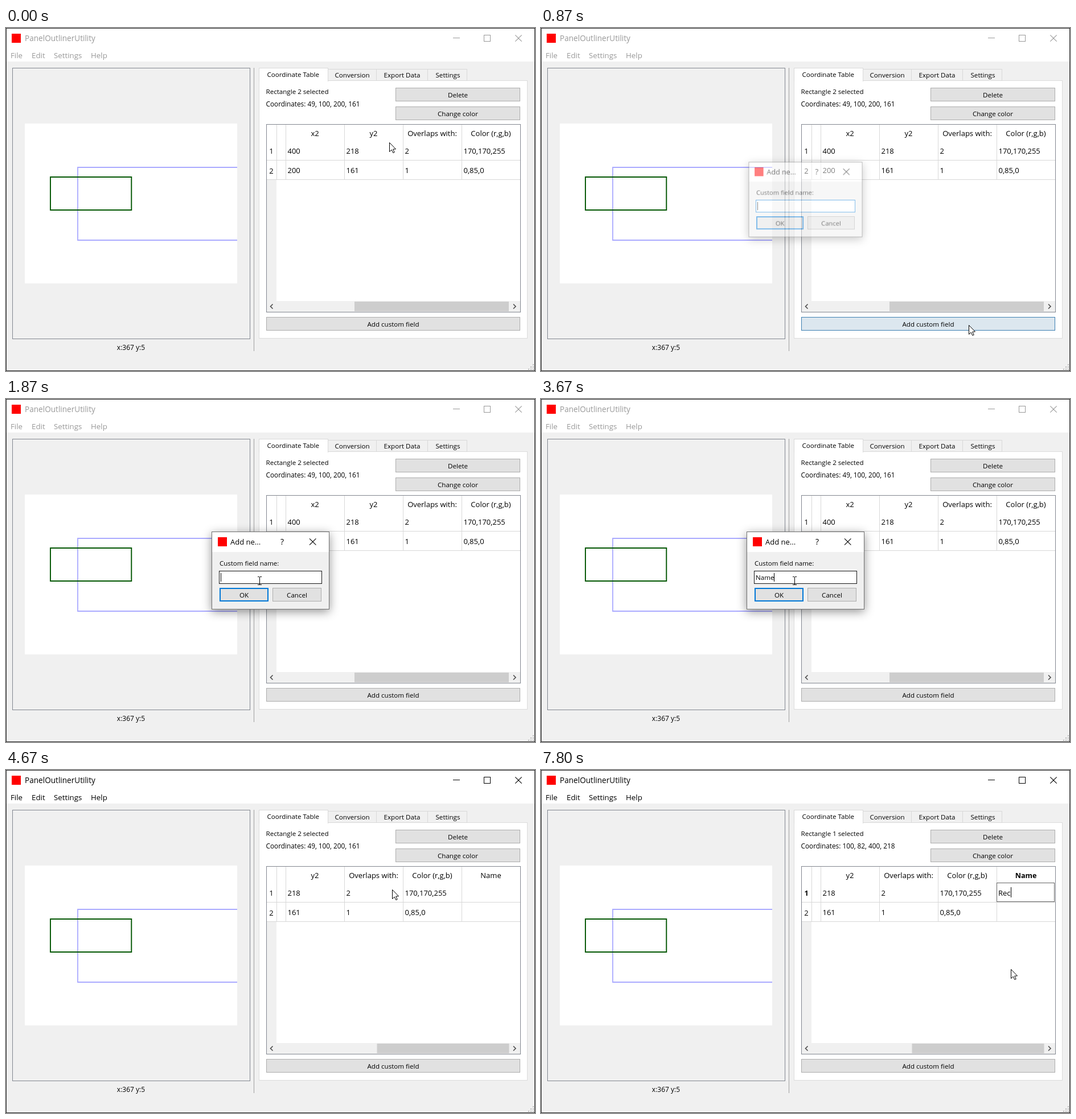
Recreate the animation shown at these times as an HTML page with a canvas. Size 929 by 603 pixels, loop 8 s.

```html
<!DOCTYPE html>
<html lang="en">
<head>
<meta charset="utf-8">
<title>Rectangle table</title>
<style>
html, body { margin: 0; width: 100%; height: 100%; overflow: hidden; background: #f0f0f0; }
canvas { display: block; }
</style>
</head>
<body>
<canvas id="stage" width="929" height="603"></canvas>
<script>
const W = 929, H = 603, LOOP = 8000, TICK = 200 / 3;
const stage = document.getElementById('stage').getContext('2d');
const layerCanvas = document.createElement('canvas');
layerCanvas.width = W;
layerCanvas.height = H;
const layer = layerCanvas.getContext('2d');
let g = stage;

const UI = '"Open Sans", "Noto Sans", sans-serif';
const SMALL = '11.6px ' + UI, CELL = '13px ' + UI, BOLD = 'bold 12.6px ' + UI;
const GREY = '#f0f0f0', GRID = '#d8d8d8', FRAME = '#828790', BLUE = '#0078d7';

const clamp = v => Math.max(0, Math.min(1, v));
const ease = v => v * v * (3 - 2 * v);

function fill(x, y, w, h, color) {
  g.fillStyle = color;
  g.fillRect(x, y, w, h);
}

// Filled box with an inner border
function box(x, y, w, h, color, border, line = 1) {
  fill(x, y, w, h, border);
  fill(x + line, y + line, w - 2 * line, h - 2 * line, color);
}

function text(str, x, y, font = SMALL, color = '#000', align = 'left') {
  g.font = font;
  g.fillStyle = color;
  g.textAlign = align;
  g.fillText(str, x, y);
  return g.measureText(str).width;
}

function path(points, color, width = 1, closed = false) {
  g.beginPath();
  points.forEach(([x, y]) => g.lineTo(x, y));
  if (closed) g.closePath();
  g.strokeStyle = color;
  g.lineWidth = width;
  g.stroke();
}

function button(label, x, y, w, h, color = '#e1e1e1', border = '#adadad', line = 1) {
  box(x, y, w, h, color, border, line);
  text(label, x + w / 2, y + h / 2 + 4.5, SMALL, '#000', 'center');
}

function cross(x, y, r, color) {
  path([[x - r, y - r], [x + r, y + r]], color, 1.1);
  path([[x + r, y - r], [x - r, y + r]], color, 1.1);
}

function drawWindow(active) {
  box(0, 0, W, H, GREY, '#2b2b2b');
  fill(1, 1, W - 2, 58, '#fff');
  const ink = active ? '#000' : '#999';
  fill(10, 10, 16, 16, '#f00');
  text('PanelOutlinerUtility', 33, 23, '13.6px ' + UI, ink);
  [['File', 8], ['Edit', 45], ['Settings', 84], ['Help', 149]]
    .forEach(([name, x]) => text(name, x, 53, '13.3px ' + UI, ink));
  fill(785, 17, 12, 1, ink);
  box(839, 12, 12, 12, '#fff', ink);
  cross(900, 18, 5.7, ink);

  for (let r = 0; r < 3; r++)
    for (let c = 0; c <= r; c++) fill(925 - c * 4, 591 + r * 4, 2, 2, '#b8b8b8');
}

function drawView() {
  box(11, 70, 418, 477, GREY, FRAME);
  fill(33, 168, 373, 281, '#fff');
  path([[406, 245], [126, 245], [126, 373], [406, 373]], '#aaaaff', 1.8);
  path([[78, 262], [220.3, 262], [220.3, 320], [78, 320]], '#005500', 1.9, true);
  text('x:367 y:5', 219.5, 566, '12px ' + UI, '#000', 'center');
  fill(435, 70, 1, 498, '#a0a0a0');
}

function drawTabs() {
  box(444, 92, 472, 454, '#fff', '#dcdcdc');
  [['Conversion', 565, 86], ['Export Data', 650, 91], ['Settings', 740, 70]].forEach(([name, x, w]) => {
    box(x, 72, w, 21, GREY, '#d9d9d9');
    text(name, x + w / 2 + (x > 700 ? 1 : 0), 87, SMALL, '#000', 'center');
  });
  box(444, 70, 122, 24, '#fff', '#d9d9d9');
  fill(445, 92, 120, 3, '#fff');
  text('Coordinate Table', 458.5, 86);
}

function addButtonColors(t) {
  if (t < 560 || t > 900) return [];
  if (t < 730) return ['#e5f1fb', BLUE];
  if (t < 860) return ['#cce4f7', '#005499'];
  return ['#dce7ef', '#3c7fb1'];
}

const COLUMNS = [
  ['y1', '82', '100'], ['x2', '400', '200'], ['y2', '218', '161'],
  ['Overlaps with:', '2', '1'], ['Color (r,g,b)', '170,170,255', '0,85,0'], ['Name', '', '']
];
const COL = 103;

function drawTable(t) {
  const added = t > 3720, scrolled = t > 4590, selected = t > 5190, editing = t > 5460;
  box(457, 169, 447, 331, '#fff', FRAME);
  fill(458, 267, 17, 213, GREY);

  // Left edge of the second column in the list
  const start = scrolled ? 388 : added ? 475 : 491;
  g.save();
  g.beginPath();
  g.rect(475, 170, 428, 310);
  g.clip();
  COLUMNS.forEach((col, i) => {
    if (i === 5 && !added) return;
    const x = start + (i - 1) * COL;
    fill(x, 170, 1, 97, GRID);
    const strong = selected && i === 5;
    text(col[0], x + COL / 2, 190, strong ? BOLD : CELL, '#000', 'center');
    text(col[1], x + 3.5, 221, CELL);
    text(col[2], x + 3.5, 255, CELL);
  });
  g.restore();

  fill(475, 170, 1, 97, GRID);
  fill(458, 232, 445, 1, GRID);
  fill(458, 266, 445, 1, GRID);
  text('1', 466, 221, selected ? BOLD : CELL, '#000', 'center');
  text('2', 466, 256, CELL, '#000', 'center');

  if (editing) drawEditor(t);
  else if (selected) fill(801, 198, 102, 34, '#cce8ff');

  fill(458, 480, 445, 19, GREY);
  if (scrolled) fill(651.5, 481, 232, 17, '#cdcdcd');
  else if (added) fill(592, 481, 232, 17, '#cdcdcd');
  else fill(612, 481, 271, 17, '#cdcdcd');
  path([[468.5, 485.5], [464.5, 489.5], [468.5, 493.5]], '#505050', 1.7);
  path([[891, 485.5], [895, 489.5], [891, 493.5]], '#505050', 1.7);
}

function drawEditor(t) {
  box(800, 198, 102, 34, '#fff', '#646464');
  const typed = 'Rec'.slice(0, [7460, 7590, 7790].filter(at => t >= at).length);
  const w = text(typed, 803, 221, CELL);
  const caret = t < 5990 || (t > 6520 && t < 7060) || t > 7460;
  if (caret) fill(Math.round(803 + w), 206, 1, 18, '#000');
}

function drawPanel(t) {
  drawTabs();
  const first = t > 5190;
  text(`Rectangle ${first ? 1 : 2} selected`, 456.5, 116);
  text('Coordinates: ' + (first ? '100, 82, 400, 218' : '49, 100, 200, 161'), 456.5, 138, '11.8px ' + UI);
  button('Delete', 684, 105, 219, 24);
  button('Change color', 684, 138, 219, 24);
  drawTable(t);
  button('Add custom field', 457, 508, 446, 24, ...addButtonColors(t));
}

function dialogBody(t) {
  g.clearRect(0, 0, W, H);
  g.save();
  g.shadowColor = 'rgba(0,0,0,.42)';
  g.shadowBlur = 16;
  g.shadowOffsetY = 4;
  fill(361, 233, 207, 137, '#707070');
  g.restore();
  box(361, 233, 207, 137, GREY, '#707070');
  fill(362, 234, 205, 35, '#fff');
  fill(372, 243, 16, 16, '#f00');
  text('Add ne...', 394, 256, CELL);
  text('?', 485, 256, '14px ' + UI, '#000', 'center');
  cross(538.7, 251, 5.7, '#000');
  text('Custom field name:', 375, 293, '11.5px ' + UI);

  box(374, 302, 181, 23, '#fff', t > 1520 ? '#171717' : BLUE);
  const typed = 'Name'.slice(0, [3320, 3460, 3520, 3660].filter(at => t >= at).length);
  const w = text(typed, 377, 318);
  const caret = t < 1330 || (t > 1860 && t < 2390) || t > 2920;
  if (caret) fill(Math.round(377 + w), 306, 1, 15, '#000');

  button('OK', 375, 332, 86, 24, '#e1e1e1', BLUE, 2);
  button('Cancel', 468, 332, 86, 24);
}

function drawDialog(t) {
  if (t < 790 || t > 3860) return;
  const opening = clamp((t - 733) / 267), closing = clamp((t - 3667) / 200);
  const alpha = opening * (1 - closing);
  const scale = 1 - 0.068 * (1 - alpha);
  g = layer;
  dialogBody(t);
  g = stage;
  g.save();
  g.globalAlpha = alpha;
  g.translate(464, 301.5);
  g.scale(scale, scale);
  g.drawImage(layerCanvas, -464, -301.5);
  g.restore();
}

// time, x, y
const MOUSE = [
  [0, 673, 201], [667, 751, 522], [867, 751, 522], [1667, 445, 319], [4266, 445, 319],
  [4667, 678, 210], [5133, 838, 222], [5400, 838, 222], [5733, 825, 350], [8000, 825, 350]
];

function mouseAt(t) {
  const i = MOUSE.findIndex(k => k[0] > t);
  const [t0, x0, y0] = MOUSE[i - 1], [t1, x1, y1] = MOUSE[i];
  const p = ease((t - t0) / (t1 - t0));
  return [Math.round(x0 + (x1 - x0) * p), Math.round(y0 + (y1 - y0) * p)];
}

const ARROW = [[0, 0], [0, 16], [3.7, 12.6], [6.3, 18], [8.7, 17], [6.2, 11.6], [11, 11.4]];

function drawMouse(t) {
  const [x, y] = mouseAt(t);
  const overField = t < 4320 && x < 555 && x > 374 && y > 301 && y < 326;
  if (overField) {
    fill(x, y - 6, 1, 14, '#000');
    [y - 7, y + 7].forEach(row => {
      fill(x - 3, row, 3, 1, '#000');
      fill(x + 1, row, 3, 1, '#000');
    });
    return;
  }
  const points = ARROW.map(([dx, dy]) => [x + dx + 0.5, y + dy + 0.5]);
  g.beginPath();
  points.forEach(([px, py]) => g.lineTo(px, py));
  g.fillStyle = '#fff';
  g.fill();
  path(points, '#000', 1, true);
}

function draw(now) {
  const t = Math.floor(((now % LOOP) + 3.4) / TICK) * TICK % LOOP;
  drawWindow((t > 60 && t < 790) || t > 3720);
  drawView();
  drawPanel(t);
  drawDialog(t);
  drawMouse(t);
}

let begin;
function loop(now) {
  begin ??= now;
  draw(Math.max(0, now - begin));
  requestAnimationFrame(loop);
}
draw(0);
requestAnimationFrame(loop);
</script>
</body>
</html>
```
